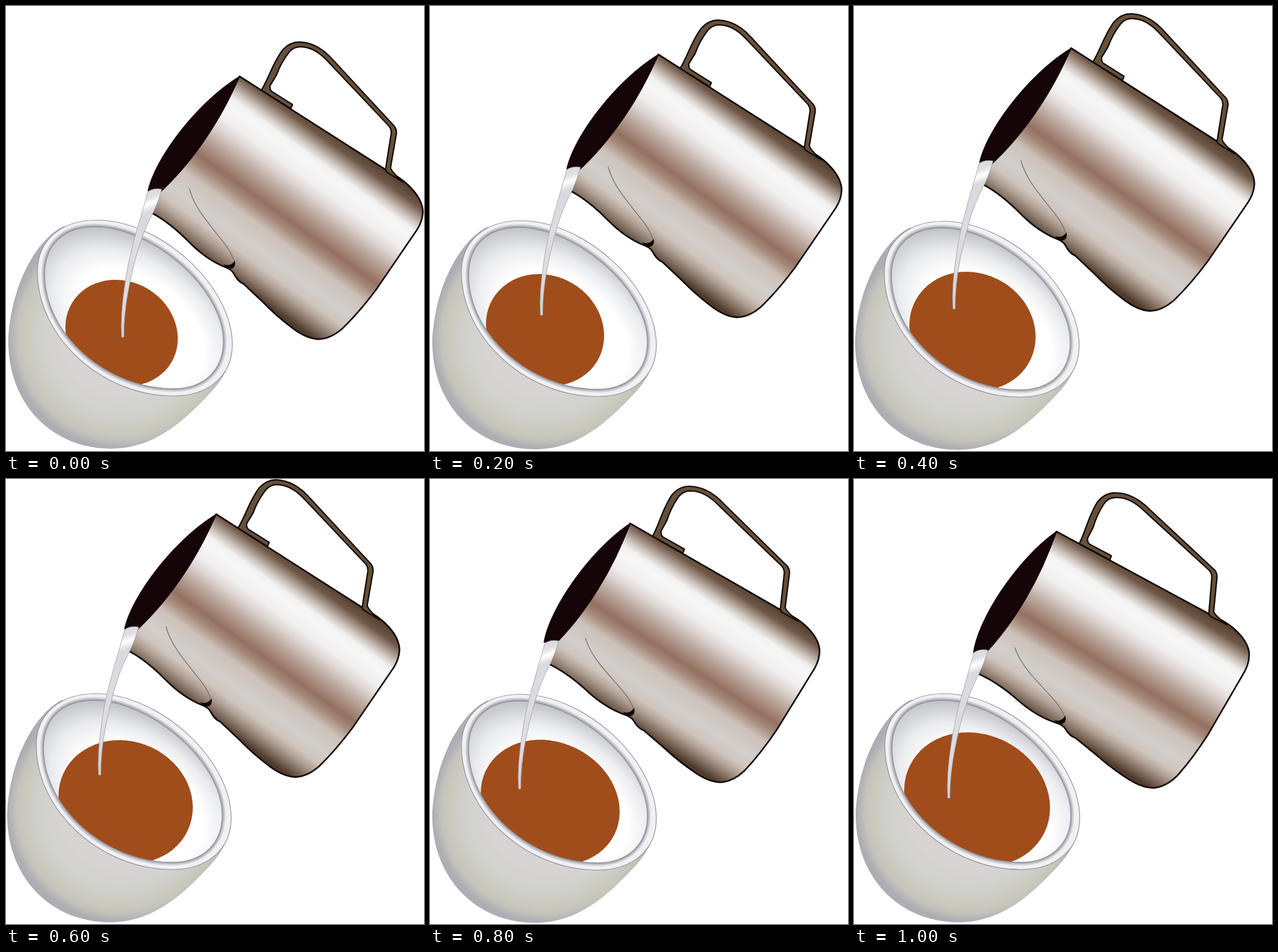
Write an HTML page that moves like this. It is 725x772 px and loops after 1200 ms.

```html
<!DOCTYPE html>
<html lang="en">
<head>
<meta charset="utf-8">
<title>Pouring milk</title>
<style>
html, body { margin: 0; width: 100%; height: 100%; overflow: hidden; background: #fff; }
svg { display: block; width: 100%; height: 100%; }
</style>
</head>
<body>
<svg viewBox="0 0 725 772">
  <defs>
    <radialGradient id="clay" gradientUnits="userSpaceOnUse" cx="200" cy="572" r="205">
      <stop offset=".5" stop-color="#d7d4d3"/>
      <stop offset=".68" stop-color="#d1d1cc"/>
      <stop offset=".82" stop-color="#c9c9be"/>
      <stop offset=".88" stop-color="#c3c3bb"/>
      <stop offset=".95" stop-color="#afadb4"/>
    </radialGradient>
    <radialGradient id="hollow" gradientUnits="userSpaceOnUse" cx=".06" cy=".24" r="1.24" gradientTransform="matrix(155 59 0 127.5 222 523.5)">
      <stop offset=".58" stop-color="#fff"/>
      <stop offset=".78" stop-color="#ebecef"/>
      <stop offset="1" stop-color="#c0c2c8"/>
    </radialGradient>
    <linearGradient id="steel" gradientUnits="userSpaceOnUse" x1="417" y1="105" x2="233" y2="359">
      <stop offset="0" stop-color="#4f3a2a"/>
      <stop offset=".07" stop-color="#6f5847"/>
      <stop offset=".11" stop-color="#a08f84"/>
      <stop offset=".15" stop-color="#cfc7c0"/>
      <stop offset=".19" stop-color="#f3f2f1"/>
      <stop offset=".23" stop-color="#f7f7f7"/>
      <stop offset=".31" stop-color="#f1eeee"/>
      <stop offset=".37" stop-color="#ddd4d0"/>
      <stop offset=".45" stop-color="#b9a59a"/>
      <stop offset=".55" stop-color="#94705f"/>
      <stop offset=".6" stop-color="#a68a7b"/>
      <stop offset=".67" stop-color="#cdc2ba"/>
      <stop offset=".78" stop-color="#d2cecb"/>
      <stop offset=".85" stop-color="#cfc5bd"/>
      <stop offset=".9" stop-color="#b0a094"/>
      <stop offset=".95" stop-color="#826f60"/>
      <stop offset="1" stop-color="#4f3b2c"/>
    </linearGradient>
    <linearGradient id="milk" gradientUnits="userSpaceOnUse" x1="245" y1="317" x2="330" y2="560">
      <stop offset="0" stop-color="#d6d6dc"/>
      <stop offset=".06" stop-color="#dfdfe4"/>
      <stop offset=".1" stop-color="#fff"/>
      <stop offset=".15" stop-color="#d9d9df"/>
      <stop offset=".6" stop-color="#dddde2"/>
      <stop offset="1" stop-color="#cfcdd2"/>
    </linearGradient>
    <path id="lip" d="M67 465C67 571 176 664 290 664C345 664 377 630 377 582C377 489 252 383 154 383C99 383 67 415 67 465Z"/>
    <clipPath id="inside"><use href="#lip"/></clipPath>
  </defs>

  <g id="bowl" fill="none">
    <path fill="url(#clay)" d="M100 382C55 403 10 480 4 575C1 690 80 768 182 768C260 768 312 715 346 680C366 660 391 630 392 592L240 500Z"/>
    <path fill="#f1f1f4" stroke="#8f8f96" stroke-width="1.2" d="M54.500 461C54.500 575 167 676.500 290 676.500C351 676.500 392.500 642 392.500 587C392.500 486 269 371.500 157 371.500C96 371.500 54.500 406 54.500 461Z"/>
    <use href="#lip" stroke="#d3d3d9" stroke-width="11"/>
    <use href="#lip" stroke="#b0b0b8" stroke-width="6"/>
    <use href="#lip" fill="url(#hollow)"/>
    <g clip-path="url(#inside)"><circle id="coffee" r="1" fill="#a04d1b"/></g>
    <use href="#lip" stroke="#8e8e96" stroke-width="1.3"/>
  </g>

  <g id="jug" stroke-linejoin="round">
    <path fill="url(#steel)" stroke="#120a08" stroke-width="2.8" d="M405 122L668 290C696 304 723 332 723 358Q722 374 713 388L642 492Q612 532 583 560Q562 578 541 578Q522 577 500 561Q470 539 446 514L412 482Q402 478 395 464Q391 457 380 453Q348 440 319 411Q285 376 253 359L267 322Q350 240 405 122Z"/>
    <path fill="#150509" stroke="#150509" d="M405 122C332 166 258 264 246 321L268 323C320 275 372 202 405 122Z"/>
    <path fill="#65503b" stroke="#140c08" stroke-width="2.4" d="M443 146C456 125 463 98 480 76Q495 60 515 63Q540 66 562 88L674 209Q678 215 677 222L667 280Q667 286 688 305L662 289Q657 286 659 279L668 222Q669 214 664 208L560 98Q538 73 515 71Q500 69 491 80Q477 98 469 120L458 138Q457 146 462 149L497 171L494 178Z"/>
    <path fill="none" stroke="#77716d" stroke-width="1.4" d="M318 317C327 350 349 374 371 402Q394 430 396 446"/>
    <path fill="#0d0706" d="M377 448Q389 453 397 442Q399 451 393 455Q384 458 377 448Z"/>
  </g>

  <path id="stream" fill="url(#milk)" stroke="#a3a3aa" stroke-width=".9" d="M246 322Q257 315 270 318Q266 334 256 357C235 397 226 427 213 489Q204 535 204.500 574Q202 576 200.500 574Q198 535 207 478C214 426 231 378 246 322Z"/>
</svg>
<script>
const STEP = 200;
// bowl: x, y; jug: x, y, turn; stream: x, y; coffee: half width, skew, half height, centre
const poses = [
  { bowl: [0, 0], jug: [0, 0, 0], stream: [0, 0], coffee: [97.5, 10, 91.5, 200.5, 567] },
  { bowl: [0, 1], jug: [-9, -38, 0], stream: [-9, -38], coffee: [102.5, 10, 96.5, 199.5, 561] },
  { bowl: [-2, 2], jug: [-28.5, -49, 0], stream: [-29, -49], coffee: [109.5, 10, 102.5, 207.5, 562] },
  { bowl: [-2, 1], jug: [-40.5, -61, 0], stream: [-40, -61], coffee: [116.5, 10, 106.5, 209.5, 559] },
  { bowl: [0, 2], jug: [-58, -45, -2.7], stream: [-47, -37], coffee: [120.5, 16, 107.5, 208.5, 559] },
  { bowl: [-1, 1], jug: [-54, -31, -4.2], stream: [-38, -21], coffee: [126.5, 15, 115, 214.5, 554.5] }
];
const place = (id, value) => document.getElementById(id).setAttribute("transform", value);

function draw(now) {
  const { bowl, jug: [x, y, turn], stream, coffee: [w, skew, h, cx, cy] } =
    poses[Math.floor(now / STEP) % poses.length];
  place("bowl", `translate(${bowl})`);
  place("jug", `translate(${x} ${y}) rotate(${turn} 405 122)`);
  place("stream", `translate(${stream})`);
  place("coffee", `matrix(${w} ${skew} 0 ${h} ${cx} ${cy})`);
}

function tick() {
  draw(performance.now());
  requestAnimationFrame(tick);
}
tick();
</script>
</body>
</html>
```
